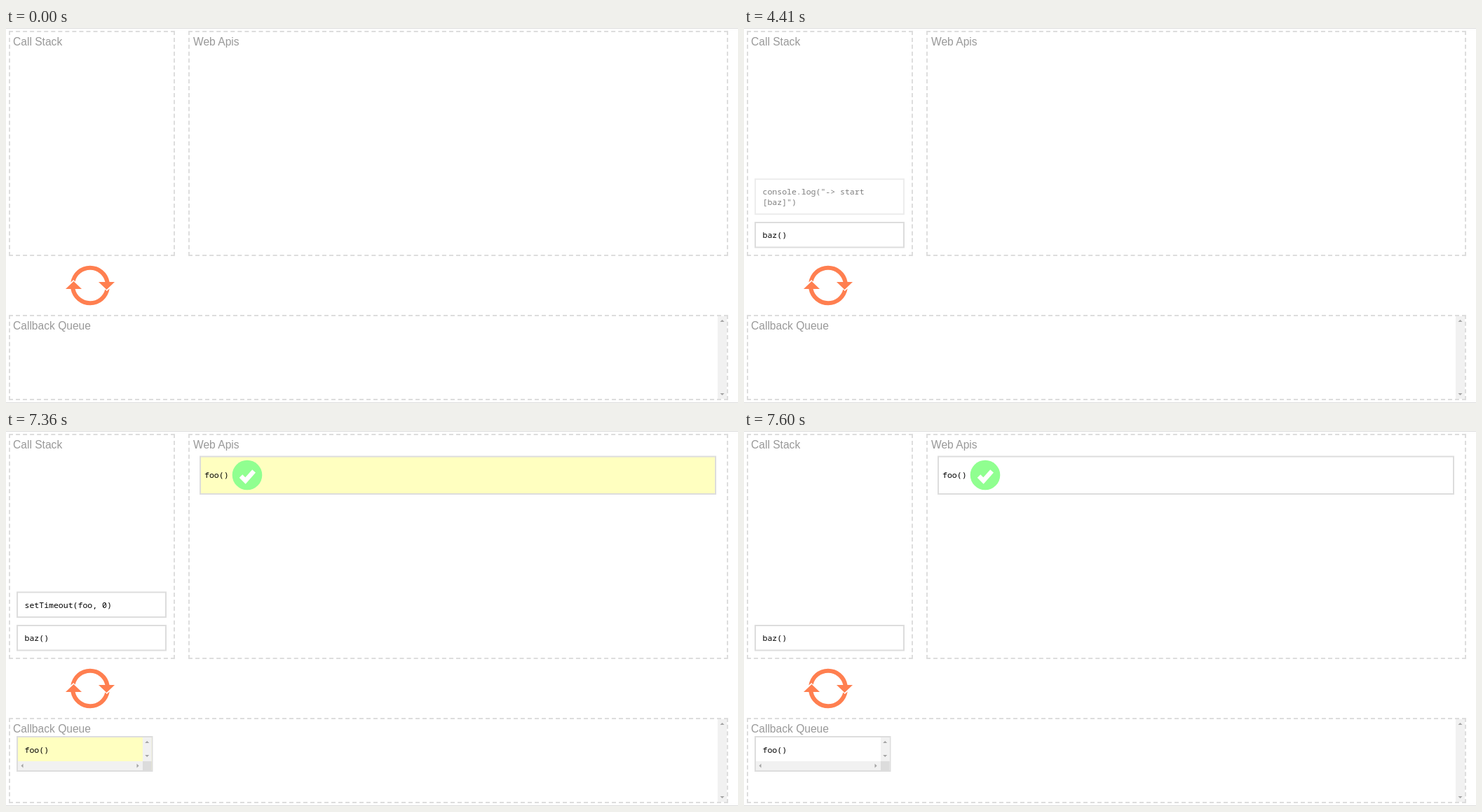
Recreate the animation shown at these times as an HTML page. Size 1044 by 536 pixels, loop 8000 ms.

```html
<!DOCTYPE html>
<html lang="en">
<head>
<meta charset="utf-8">
<title>Event loop</title>
<style>
  html, body { margin: 0; width: 100%; height: 100%; overflow: hidden; background: #fff; }
  .panel { position: absolute; box-sizing: border-box; border: 2px dashed #ddd; }
  #stack { left: 4px; top: 4px; width: 237px; height: 322px; }
  #apis { left: 260px; top: 4px; width: 770px; height: 322px; }
  #queue { left: 4px; top: 410px; width: 1026px; height: 122px; }
  svg { position: absolute; left: 0; top: 0; }
  .label { font: 15.6px "Liberation Sans", Arial, sans-serif; fill: #999; }
  .code { font: 11.53px "Noto Sans Mono", Consolas, monospace; fill: #000; white-space: pre; }
  .box { fill: #fff; stroke: #ddd; stroke-width: 2; }
  .bar { fill: #f1f1f1; }
  .tip { fill: #a3a3a3; }
</style>
</head>
<body>
<div class="panel" id="stack"></div>
<div class="panel" id="apis"></div>
<div class="panel" id="queue"></div>
<svg width="1044" height="536" viewBox="0 0 1044 536">
  <defs>
    <path id="up" class="tip" d="M-3 1.5L0 -1.5L3 1.5Z"/>
    <path id="half" d="M92.3 363.5A28 28 0 0 1 147.6 363H155L143.5 374L132 363H141.4A22 22 0 0 0 98.6 362.4L96.3 360Z"/>
  </defs>
  <path d="M0 .5H1044M0 535.5H1044" stroke="#ddd"/>
  <g class="label">
    <text x="10" y="25">Call Stack</text>
    <text x="267" y="25">Web Apis</text>
    <text x="10" y="431">Callback Queue</text>
  </g>
  <g fill="#ff7f50">
    <use href="#half"/>
    <use href="#half" transform="rotate(180 120 368)"/>
  </g>
  <rect class="bar" x="1015" y="412" width="13" height="118"/>
  <use href="#up" x="1021.5" y="418.5"/>
  <use href="#up" transform="translate(1021.5 523.5) rotate(180)"/>

  <g class="code">
    <g id="baz">
      <rect class="box" x="16" y="278" width="212" height="35.5"/>
      <text x="26.5" y="300">baz()</text>
    </g>
    <g id="log">
      <rect class="box" x="16" y="216" width="212" height="50"/>
      <text x="26.5" y="238">console.log("-&gt; start</text>
      <text x="26.5" y="252.5">[baz]")</text>
    </g>
    <g id="timeout">
      <rect class="box" x="16" y="230.5" width="212" height="35.5"/>
      <text x="26.5" y="252.5">setTimeout(foo, 0)</text>
    </g>
    <g id="foo">
      <rect class="box flash" x="277" y="36.5" width="735" height="53.5"/>
      <text x="283" y="66.5">foo()</text>
      <circle cx="344" cy="63" r="21.3" fill="#90ff90"/>
      <path d="M335 64.5L341.5 71L353.6 57.4" fill="none" stroke="#fff" stroke-width="6.4"/>
      <rect class="box flash" x="16" y="437" width="192.5" height="49"/>
      <text x="26.5" y="459.5">foo()</text>
      <path class="bar" d="M195 438H207.5V472H195ZM17 472H195V485H17Z"/>
      <path fill="#dcdcdc" d="M195 472H207.5V485H195Z"/>
      <use href="#up" x="201.2" y="444.5"/>
      <use href="#up" transform="translate(201.2 464.5) rotate(180)"/>
      <use href="#up" transform="translate(23 478.5) rotate(-90)"/>
      <use href="#up" transform="translate(188 478.5) rotate(90)"/>
    </g>
  </g>
</svg>
<script>
  const LOOP = 8000;
  const $ = id => document.getElementById(id);
  const flashes = document.querySelectorAll('.flash');

  // Each track lists [time, value]; the latest value reached holds.
  const opacity = {
    baz: [[0, 0], [1460, .5], [1520, 1]],
    log: [[0, 0], [2930, .5], [3000, 1], [4410, .5], [4490, 0]],
    timeout: [[0, 0], [5890, .5], [5950, 1], [7450, .5], [7510, 0]],
    foo: [[0, 0], [7360, 1]]
  };
  const flashBlue = [[0, 192], [7450, 218], [7510, 235], [7600, 255]];
  const valueAt = (track, t) => track.filter(([start]) => start <= t).pop()[1];

  function draw(now) {
    const t = now % LOOP;
    for (const id in opacity) $(id).style.opacity = valueAt(opacity[id], t);
    const color = `rgb(255, 255, ${valueAt(flashBlue, t)})`;
    flashes.forEach(box => box.style.fill = color);
  }

  const start = performance.now();
  function tick() {
    draw(performance.now() - start);
    requestAnimationFrame(tick);
  }
  tick();
</script>
</body>
</html>
```
